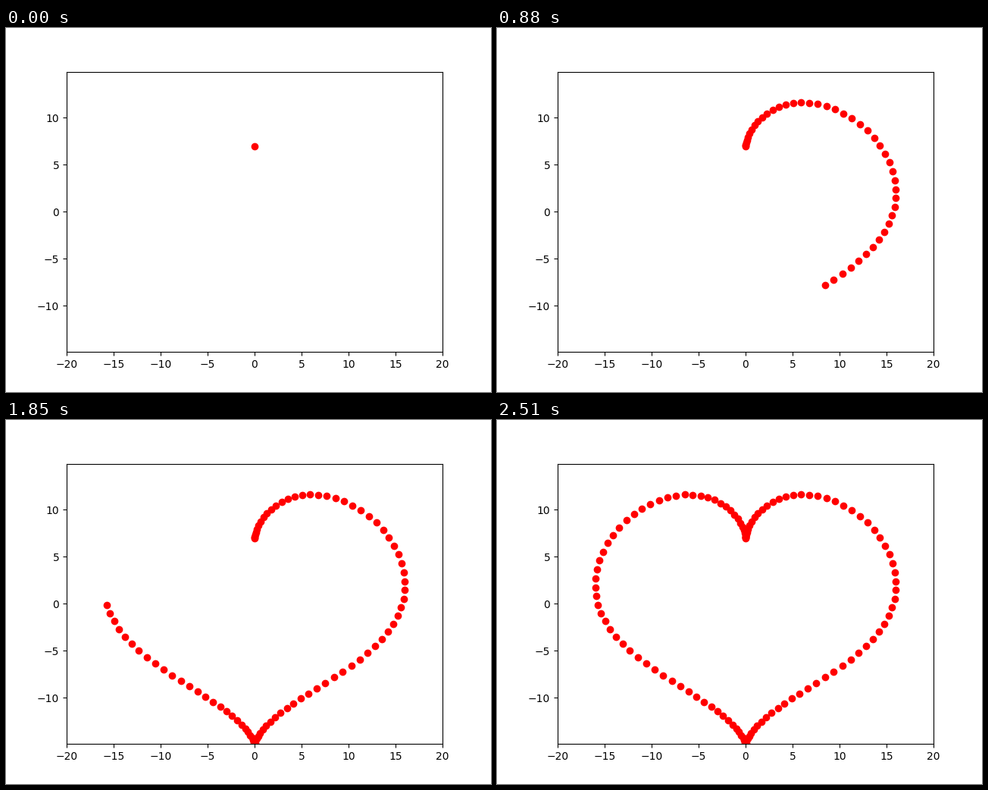
Write a matplotlib script that moves like this. It is 640x480 px and loops after 2530 ms.

```python
import numpy as np
import matplotlib.pyplot as plt
from matplotlib.animation import FuncAnimation

LOOP_MS = 2530
TICK_MS = 10
STEP = 0.05

t = np.arange(0, 2 * np.pi, STEP)
x = 16 * np.sin(t) ** 3
y = 13 * np.cos(t) - 3 * np.cos(2 * t) - 2 * np.cos(3 * t) - np.cos(4 * t)

fig, ax = plt.subplots(figsize=(6.4, 4.8), dpi=100)

# same scale on both axes
box = ax.get_position()
half_height = 20 * (box.height * 4.8) / (box.width * 6.4)
ax.set_xlim(-20, 20)
ax.set_ylim(-half_height, half_height)

dots, = ax.plot([], [], "ro")


def update(tick):
    # a new dot every two ticks, with one extra tick of rest at the bottom tip
    last = (tick - (tick > 125)) // 2
    dots.set_data(x[:last + 1], y[:last + 1])
    return dots,


anim = FuncAnimation(fig, update, frames=LOOP_MS // TICK_MS,
                     interval=TICK_MS, repeat=True, repeat_delay=0)
plt.show()
```
